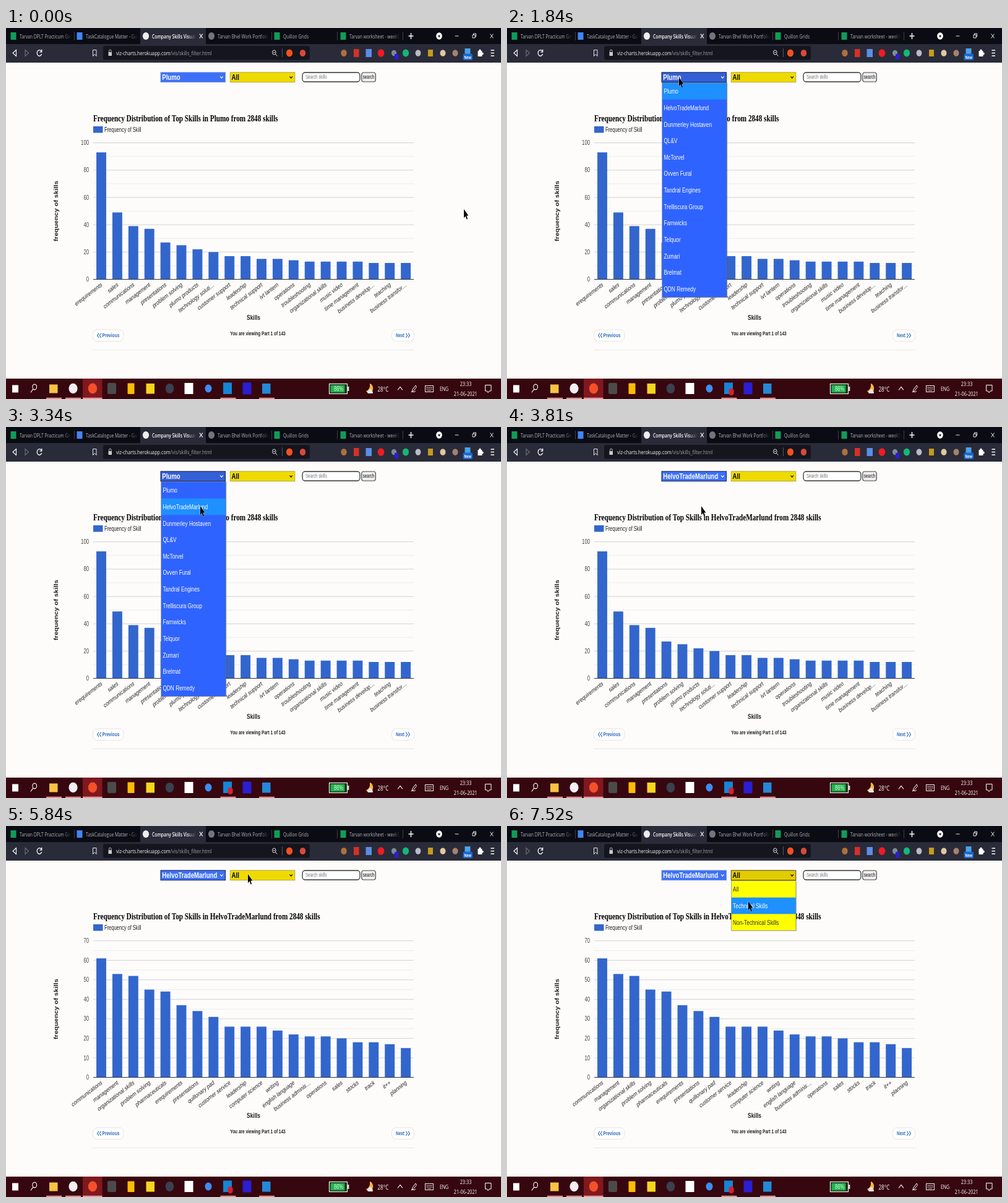
An HTML page for the animation above (8000 ms loop, 800x600 px).

```html
<!DOCTYPE html>
<html lang="en">
<head>
<meta charset="utf-8">
<title>Skills dashboard</title>
<style>
  html, body { margin: 0; width: 100%; height: 100%; overflow: hidden; background: #fdfcfb; }
  svg { display: block; }
  text { white-space: pre; }
  .sans { font-family: "Liberation Sans", Arial, sans-serif; }
  .serif { font-family: "Liberation Serif", Times, serif; }
  .ui { font-family: "Open Sans", "Noto Sans", sans-serif; }
</style>
</head>
<body>
<svg id="stage" width="800" height="600" viewBox="0 0 800 600"></svg>
<script>
const stage = document.getElementById('stage');
const LOOP = 8000;
const SQUEEZE = 0.75; // the 16:9 desktop is shown on a 4:3 stage

function el(tag, attrs, parent = stage) {
  const node = document.createElementNS('http://www.w3.org/2000/svg', tag);
  for (const key in attrs) node.setAttribute(key, attrs[key]);
  return parent.appendChild(node);
}
const group = (parent = stage) => el('g', {}, parent);
const box = (x, y, width, height, fill, more = {}, parent) =>
  el('rect', { x, y, width, height, fill, ...more }, parent);
const dot = (cx, cy, r, fill, parent) =>
  el('ellipse', { cx, cy, rx: r * 0.85, ry: r, fill }, parent);
const line = (d, stroke, width = 1, parent) =>
  el('path', { d, stroke, 'stroke-width': width, fill: 'none' }, parent);

function label(str, x, y, size, fill, opt = {}, parent) {
  const { font = 'sans', weight = 400, anchor = 'start', turn = 0 } = opt;
  const node = el('text', {
    class: font, fill, 'font-size': size, 'font-weight': weight, 'text-anchor': anchor,
    transform: `translate(${x} ${y}) scale(${SQUEEZE} 1) rotate(${turn})`
  }, parent);
  node.textContent = str;
  return node;
}
const show = (node, on) => node.setAttribute('visibility', on ? 'visible' : 'hidden');

const companies = ['Plumo', 'HelvoTradeMarlund', 'Dunmerley Hostaven', 'QL&V', 'McTorvel',
  'Ovven Fural', 'Tandral Engines', 'Trelliscura Group', 'Farnwicks', 'Telquor',
  'Zumari', 'Brelmat', 'QDN Remedy'];

// ---------- browser ----------
function fadeTo(id, color) {
  const g = el('linearGradient', { id });
  el('stop', { offset: 0, 'stop-color': color, 'stop-opacity': 0 }, g);
  el('stop', { offset: 1, 'stop-color': color }, g);
}

function browser() {
  const strip = '#0b0b13', bar = '#2a2b39', pale = '#e4e4ea';
  fadeTo('fadeStrip', strip);
  fadeTo('fadeBar', bar);
  box(0, 0, 800, 27, strip);
  box(0, 26, 800, 30, bar);
  box(217, 0, 106, 27, bar);

  const tabs = [
    [12, 'Tarvan DPLT Practicum Group', '#0f9d58', 106],
    [119, 'TaskCatalogue Matter - Guide', '#4285f4', 213],
    [226, 'Company Skills Visualise', '#eeeeee', 307],
    [332, 'Tarvan Bhel Work Portfolio', '#74757c', 425],
    [438, 'Quillon Grids', '#0f9d58', 530],
    [545, 'Tarvan worksheet - week5', '#0f9d58', 637]
  ];
  tabs.forEach(([x, name, color, end], i) => {
    const active = i === 2;
    if (active || i === 3) dot(x, 13, 6, color);
    else box(x - 4.5, 7, 9, 12, color);
    const view = el('svg', { x: x + 9, y: 0, width: end - x - 9, height: 26 });
    label(name, 1, 16.5, 9, active ? '#fff' : '#b4b4bd', { font: 'ui', weight: active ? 600 : 400 }, view);
    box(end - 14, 3, 14, 20, active ? 'url(#fadeBar)' : 'url(#fadeStrip)');
  });
  line('M110.5 6V20M429.5 6V20M535.5 6V20M641.5 6V20', '#4b4b55', 0.8);
  line('M312.8 9.5l5 7m0 -7l-5 7', '#fff', 1.2);
  line('M650.5 13h8M654.5 8v10', '#fff', 1.4);
  dot(700, 13, 5.7, '#fff');
  el('path', { d: 'M698 12h4l-2 3.5z', fill: strip });
  line('M725.5 13h6M754 11h4v5h-4zM755.5 11v-2h4v5h-1.5M782.5 9.5l5 7m0 -7l-5 7', pale, 1);

  line('M16.5 35.5L11 40.5l5.5 5z', '#fff', 1.1);
  line('M31 35.5l5.5 5l-5.5 5z', '#6e6f7b', 1.1);
  line('M57 37.5A3.8 4.8 0 1 0 57.6 42M57.7 34.8v4h-3.3', '#fff', 1.3);
  line('M140.5 35.5h5.5v10l-2.75 -3l-2.75 3z', pale, 1);
  box(157, 29, 334, 22.5, '#15151d', { rx: 3 });
  box(165.5, 39, 5.5, 6, '#c9c9d0', { rx: 0.6 });
  line('M166.6 39v-2a1.7 2 0 0 1 3.4 0v2', '#c9c9d0', 0.9);
  const url = label('viz-charts.herokuapp.com', 178, 44, 9.7, '#f2f2f5', { font: 'ui' });
  el('tspan', { fill: '#a0a0aa' }, url).textContent = '/vis/skills_filter.html';
  el('ellipse', { cx: 433.3, cy: 39.5, rx: 2.8, ry: 3.6, fill: 'none', stroke: pale, 'stroke-width': 1 });
  line('M435.5 42.2l2.8 3.3M432 39.5h2.6', pale, 1);
  line('M446.5 33v14', '#55555f');
  dot(458, 40.5, 6, '#f4511e');
  dot(479.5, 40.5, 5.5, '#d84a3c');

  dot(546, 40.5, 5.5, '#b0703c');
  box(562, 34, 8.5, 13, '#d93025');
  box(581.5, 34, 9.5, 13, '#5b8de8');
  dot(606, 40.5, 6.3, '#ee1c25');
  dot(627, 40.5, 4.8, '#7d8a9c');
  box(628, 42, 6.5, 9, '#2b1fd0', { rx: 1 });
  dot(646, 40.5, 6, '#15b67c');
  dot(666, 40.5, 5.2, '#b9bcc4');
  box(682, 35, 8, 11, '#c79a1e');
  dot(706, 40.5, 5.3, '#e2c7a1');
  dot(726, 40.5, 5.3, '#a6826e');
  box(741.5, 33, 9, 11, '#4aa3e8');
  box(738.5, 41.5, 15.5, 10.5, '#1967d2', { rx: 2 });
  label('New', 746.2, 49.6, 7.5, '#fff', { weight: 700, anchor: 'middle' });
  box(762.5, 37, 7, 9, '#fff', { rx: 0.8 });
  dot(766, 36.5, 2, '#fff');
  dot(770, 41.5, 2, '#fff');
  line('M783.5 36h5.5M783.5 40.5h5.5M783.5 45h5.5', '#fff', 1.3);
}

// ---------- taskbar ----------
function taskbar() {
  box(0, 567, 800, 33, '#37070f');
  box(0, 567, 800, 1, '#450b13');
  box(124, 567, 31.5, 33, '#80181f');
  box(10, 577.5, 10, 12, '#fff');
  el('ellipse', { cx: 46.2, cy: 580.5, rx: 3.4, ry: 4.4, fill: 'none', stroke: '#fff', 'stroke-width': 1.1 });
  line('M43.8 584l-4 5.5', '#fff', 1.2);
  box(70, 576.5, 13.5, 14, '#f6c344');
  dot(108.5, 583, 8.3, '#f3eef2');
  dot(140, 583, 8.5, '#f4502a');
  box(164, 574, 14, 18, '#4b4b4b', { rx: 2 });
  box(196.5, 574.5, 11, 17.5, '#fbbc04', { rx: 1 });
  box(226.5, 575, 13.5, 16.5, '#f6d51f');
  dot(264.5, 583, 8, '#3a4150');
  box(288.5, 574, 14, 18, '#fff');
  dot(327, 583, 6.5, '#3d8df5');
  box(351, 573.5, 14, 18.5, '#1486d6');
  box(382.5, 573.5, 14, 19, '#2a1fd2', { rx: 1 });
  box(414, 575, 13.5, 16.5, '#2489d8');
  for (const x of [65, 96, 346.5, 409]) box(x, 597.8, 25, 2.2, '#e58b8f');
  box(124, 597.8, 31.5, 2.2, '#ee9598');

  box(522.5, 575.5, 29, 16, '#0d2a12', { stroke: '#f3f3f3', 'stroke-width': 1.2 });
  box(524.5, 577.5, 23, 12, '#22b14c');
  box(552.3, 580, 2, 7, '#f3f3f3');
  label('86%', 537.5, 587.3, 10, '#e9ffe9', { anchor: 'middle' });

  el('path', { d: 'M588 575a6 8 0 1 1 -6 12q7 -2 6 -12z', fill: '#f6b73c' });
  el('path', { d: 'M585 591a2.5 3 0 0 1 1 -5a3 4 0 0 1 5.5 1a2 2.5 0 0 1 1 4z', fill: '#e9e4e6' });
  label('28°C', 600.5, 587.5, 10.8, '#fff', { font: 'ui' });
  line('M633 585.5l4 -5l4 5', '#fff', 1.1);
  line('M655.5 589l2 -5l4.5 -6l1.5 2.5l-4.5 6zM657 588q3 2 5 -1', '#fff', 1);
  box(677.5, 578.5, 13, 10, 'none', { stroke: '#fff', 'stroke-width': 0.9 });
  line('M679 581.5h10M679 584h10M681 586.5h6', '#d8ccce', 0.8);
  label('ENG', 708, 586.5, 9.3, '#fff', { font: 'ui', anchor: 'middle' });
  label('23:33', 743, 579.3, 9.8, '#fff', { font: 'ui', anchor: 'middle' });
  label('21-06-2021', 742.8, 594.5, 9.7, '#fff', { font: 'ui', anchor: 'middle' });
  line('M774.5 577.5h9.5v9.5h-3l-2 2.8l-1.5 -2.8h-3z', '#fff', 1);
}

// ---------- chart ----------
const LEFT = 141, RIGHT = 659, TOP = 185.7, BASE = 406.5;

function chart(max, step, values, names) {
  const g = group();
  const yOf = v => BASE - (BASE - TOP) * v / max;
  for (let v = step / 2; v <= max; v += step / 2) {
    const major = v % step === 0;
    box(LEFT, yOf(v) - 0.5, RIGHT - LEFT, 1, major ? '#d2d2d2' : '#ededed', {}, g);
  }
  for (let v = 0; v <= max; v += step)
    label(v, 134, yOf(v) + 3.6, 10.3, '#444', { anchor: 'end' }, g);
  const pitch = (RIGHT - LEFT) / values.length;
  values.forEach((v, i) => {
    const x = LEFT + pitch * (i + 0.5);
    box(x - 7.9, yOf(v), 15.9, BASE - yOf(v), '#3366cc', {}, g);
    label(names[i], x + 2, 417, 10.3, '#222', { anchor: 'end', turn: -30 }, g);
  });
  box(LEFT, BASE - 0.5, RIGHT - LEFT, 1, '#333', {}, g);
  return g;
}

function page() {
  box(0, 56, 800, 511, '#fdfcfb');
  box(141, 159, 15.5, 10.5, '#3366cc');
  label('Frequency of Skill', 159, 167.8, 10, '#222');
  label('frequency of skills', 84, 296, 11.15, '#222', { weight: 700, anchor: 'middle', turn: -90 });
  label('Skills', 400, 472, 11.2, '#222', { weight: 700, anchor: 'middle' });

  const pill = (x, w) => box(x, 488, w, 18.5, '#fff', { rx: 6, ry: 8, stroke: '#e4e4e4', 'stroke-width': 1 });
  pill(140.5, 49.5);
  pill(623.5, 36);
  const link = '#2f6cc0';
  line('M150 493.5l-2.4 3.7l2.4 3.7M153.6 493.5l-2.4 3.7l2.4 3.7', link, 1.1);
  label('Previous', 155.5, 500.3, 8.8, link, { weight: 700 });
  label('Next', 630, 500.3, 8.6, link, { weight: 700 });
  line('M646.3 493.5l2.4 3.7l-2.4 3.7M650 493.5l2.4 3.7l-2.4 3.7', link, 1.1);
  label('You are viewing Part 1 of 143', 407, 496.7, 8.67, '#222', { weight: 700, anchor: 'middle' });
  line('M140 520.5H660', '#e6e6e6');

  box(479, 72, 93, 15, '#fff', { rx: 4, ry: 5, stroke: '#333', 'stroke-width': 1.3 });
  label('Search skills', 484, 82.4, 8.2, '#777');
  box(574.8, 72, 22.5, 15, '#efefef', { rx: 3, ry: 4, stroke: '#444', 'stroke-width': 1.2 });
  label('search', 586, 82.4, 8.2, '#111', { anchor: 'middle' });
}

function select(x, fill, ink, value) {
  const frame = box(x, 71.8, 104.5, 15.8, fill, { 'stroke-width': 1 });
  const text = label(value, x + 2.3, 84, 12.8, ink, { weight: 700 });
  line(`M${x + 96.2} 78.3l2.2 2.8l2.2 -2.8`, ink, 1.2);
  return { frame, text };
}

const ROW = 26.65;
function menu(x, fill, ink, options) {
  const g = group();
  const h = ROW * options.length + 0.8;
  box(x + 0.5, 89, 105, h, '#000', { opacity: 0.22 }, g);
  box(x, 88.3, 104.5, h, fill, { stroke: '#777', 'stroke-width': 0.6 }, g);
  const mark = box(x + 0.3, 89, 104, ROW, '#1e90ff', {}, g);
  const texts = options.map((s, i) => label(s, x + 2.6, 106.2 + ROW * i, 11.1, ink, {}, g));
  return {
    pick(row) {
      show(g, row >= 0);
      mark.setAttribute('y', 89 + ROW * Math.max(row, 0));
      texts.forEach((t, i) => t.setAttribute('fill', i === row ? '#fff' : ink));
    }
  };
}

// ---------- build ----------
page();
const title = label('', 141, 150.5, 14.94, '#000', { font: 'serif', weight: 700 });
const firstChart = chart(100, 20,
  [93, 49, 39, 37, 27, 25, 22, 20, 17, 17, 15, 15, 14, 13, 13, 13, 13, 12, 12, 12],
  ['erequirements', 'sales', 'communications', 'management', 'presentations', 'problem solving',
    'plumo products', 'technology soluti…', 'customer support', 'leadership', 'technical support',
    'ivt lantern', 'operations', 'troubleshooting', 'organizational skills', 'music video',
    'time management', 'business develop…', 'teaching', 'business transfor…']);
const nextChart = chart(70, 10,
  [61, 53, 52, 45, 44, 37, 34, 31, 26, 26, 26, 24, 22, 21, 21, 20, 18, 18, 17, 15],
  ['communications', 'management', 'organizational skills', 'problem solving', 'pharmaceuticals',
    'erequirements', 'presentations', 'quillonary pad', 'customer service', 'leadership',
    'computer science', 'writing', 'english language', 'business adminis…', 'operations', 'sales',
    'stocks', 'track', 'it++', 'planning']);
const company = select(250, '#3d70fa', '#fff', '');
const kind = select(362.3, '#efda00', '#000', 'All');
const companyMenu = menu(250.8, '#2f63ff', '#fff', companies);
const kindMenu = menu(362.5, '#ffff00', '#333', ['All', 'Technical Skills', 'Non-Technical Skills']);
browser();
taskbar();
const hover = box(778, 29, 17, 22.5, '#33272f', { 'fill-opacity': 0.3, stroke: '#7c2a35', 'stroke-width': 1.2, rx: 1.5 });
const recording = box(358.5, 583, 8, 11, '#d8222e', { rx: 4 });
const cursor = el('path', {
  d: 'M0 0V14.2L2.6 11.3L4.4 16.4L6 15.4L4.3 10.6H7.4Z',
  fill: '#000', stroke: '#fff', 'stroke-width': 0.6, 'paint-order': 'stroke'
});

// ---------- timeline ----------
// time, pointer x, pointer y
const path = [
  [0, 740, 293], [40, 732, 289], [200, 671, 265], [360, 500, 185], [520, 342, 115],
  [1020, 322, 106], [1180, 299, 98], [1340, 284, 86], [1500, 278, 80],
  [2340, 280, 120], [2500, 284, 148], [2670, 287, 169], [2820, 291, 175],
  [3000, 301, 163], [3180, 309, 144], [3340, 314, 128],
  [4580, 334, 126], [4740, 368, 114], [4900, 398, 97], [5070, 409, 78],
  [5230, 404, 78], [5390, 397, 78], [5540, 391, 78],
  [7360, 391, 104], [7520, 390, 122]
];
// time, highlighted row (-1 = closed)
const companyRows = [[0, -1], [1840, 0], [2340, 1], [2500, 2], [2820, 3], [3000, 2], [3340, 1], [3810, -1]];
const kindRows = [[0, -1], [6880, 0], [7520, 1]];
const at = (steps, t) => steps.findLast(s => s[0] <= t);

function draw(t) {
  const [, x, y] = at(path, t);
  cursor.setAttribute('transform', `translate(${x} ${y})`);
  const row = at(companyRows, t)[1], kindRow = at(kindRows, t)[1];
  companyMenu.pick(row);
  kindMenu.pick(kindRow);

  const name = companies[t < 3810 ? 0 : 1];
  company.text.textContent = name;
  title.textContent = `Frequency Distribution of Top Skills in ${name} from 2848 skills`;
  company.frame.setAttribute('fill', row >= 0 ? '#345fd6' : '#3d70fa');
  company.frame.setAttribute('stroke', t >= 1840 && t < 6880 ? '#17213f' : '#7d94cf');
  kind.frame.setAttribute('fill', kindRow >= 0 ? '#e2cc00' : '#efda00');
  kind.frame.setAttribute('stroke', kindRow >= 0 ? '#4a4520' : '#b5a936');

  show(firstChart, t < 5700);
  show(nextChart, t >= 5700);
  show(hover, t >= 40 && t < 1840);
  show(recording, t >= 40);
}

const start = performance.now();
function tick() {
  draw((performance.now() - start) % LOOP);
  requestAnimationFrame(tick);
}
tick();
</script>
</body>
</html>
```
